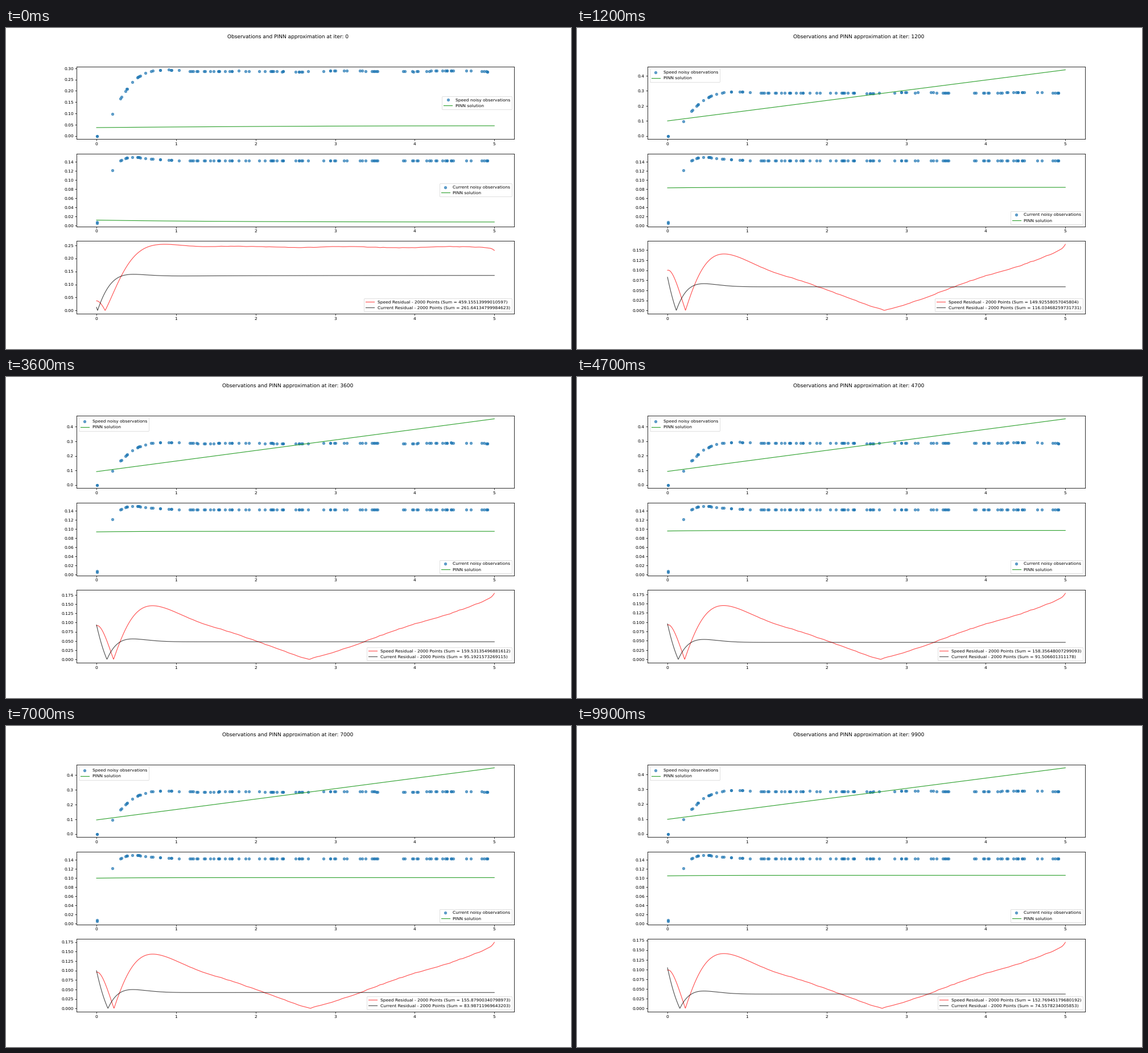
A matplotlib script for the animation above (10000 ms loop, 993 by 564 pixels).

```python
import numpy as np
import matplotlib.pyplot as plt
from matplotlib.animation import FuncAnimation

plt.rcParams.update({
    "text.hinting": "none",
    "font.family": "DejaVu Sans",
    "axes.linewidth": 1.1,
    "xtick.major.width": 1.0,
    "ytick.major.width": 1.0,
})

W, H, DPI = 993, 564, 53.8
FRAMES, STEP = 100, 100
N = 2000
t = np.linspace(0, 5, N)
rng = np.random.default_rng(12)


def step_response(final, decay, freq, lag):
    """Damped rise from 0 to a final level."""
    ring = np.cos(freq * t) + lag * np.sin(freq * t)
    return final * (1 - np.exp(-decay * t) * ring)


def fade(it, tau):
    return np.exp(-it / tau)


# Motor speed: damped rise, slow ripple, small noise and a dip at the very end
knots = np.arange(0, 5.05, 0.04)
noise = 0.0005 * np.interp(t, knots, rng.normal(size=knots.size))
ripple = 0.002 * np.cos(2 * np.pi * (t - 1.8) / 1.33)
settled = np.clip((t - 0.9) / 0.5, 0, 1)
speed = (step_response(0.285 + 0.0006 * t, 4.15, 3.62, 4.15 / 3.62)
         + settled * (ripple + noise) - 0.011 * np.exp((t - 5) / 0.04))
current = step_response(0.1426, 5.45, 4.245, -0.283)

obs_t = np.r_[0.006, 0.008, 0.199, 0.303, 0.314, rng.uniform(0.35, 4.93, 92)]
obs_speed = np.interp(obs_t, t, speed)
obs_current = np.interp(obs_t, t, current)


def speed_fit(it):
    """Network's speed curve: it tilts up fast, then drifts slowly."""
    start = (0.0876 + 1.1e-6 * it - 0.0511 * fade(it, 150)
             + 0.03 * np.exp(-((it - 800) / 400) ** 2))
    end = 0.46 - 1.49e-6 * it - 0.415 * fade(it, 385)
    u = t / 5
    return start + (end - start) * u + 0.0075 * fade(it, 150) * u * (1 - u)


def current_fit(it):
    """Network's current curve: nearly flat, rising towards the data."""
    end = 0.0886 + 1.73e-6 * it - 0.0806 * fade(it, 487)
    offset = -0.0012 + 0.0055 * fade(it, 300)
    tau = 0.45 + 1.05 * fade(it, 150)
    return end + offset * np.exp(-t / tau)


fig, (ax_s, ax_c, ax_r) = plt.subplots(
    3, 1, figsize=((W + 1e-6) / DPI, (H + 1e-6) / DPI), dpi=DPI)
fig.subplots_adjust(right=0.8995)
title = fig.suptitle("", x=0.499)


def observed_panel(ax, values, name):
    ax.scatter(obs_t, values, alpha=0.7, label=f"{name} noisy observations")
    line, = ax.plot(t, t, color="#2ca02c", label="PINN solution")
    ax.legend(loc="best")
    return line


pinn_s = observed_panel(ax_s, obs_speed, "Speed")
pinn_c = observed_panel(ax_c, obs_current, "Current")
res_s, = ax_r.plot(t, t, color="red", alpha=0.7, label="Speed")
res_c, = ax_r.plot(t, t, color="black", alpha=0.7, label="Current")
sums = ax_r.legend(loc="lower right").get_texts()

for ax in (ax_s, ax_c, ax_r):
    ax.set_xlim(-0.25, 5.25)


def fit_y(ax, *series):
    lo = min(s.min() for s in series)
    hi = max(s.max() for s in series)
    pad = 0.05 * (hi - lo)
    ax.set_ylim(lo - pad, hi + pad)


def update(frame):
    it = frame * 100
    s, c = speed_fit(it), current_fit(it)
    rs, rc = np.abs(speed - s), np.abs(current - c)

    for line, y in ((pinn_s, s), (pinn_c, c), (res_s, rs), (res_c, rc)):
        line.set_ydata(y)
    fit_y(ax_s, obs_speed, s)
    fit_y(ax_c, obs_current, c)
    fit_y(ax_r, rs, rc)

    title.set_text(f"Observations and PINN approximation at iter: {it}")
    for text, name, r in zip(sums, ("Speed", "Current"), (rs, rc)):
        text.set_text(f"{name} Residual - {N} Points (Sum = {r.sum()})")
    return []


anim = FuncAnimation(fig, update, frames=FRAMES, interval=STEP,
                     repeat=True, repeat_delay=0, blit=False)
plt.show()
```
